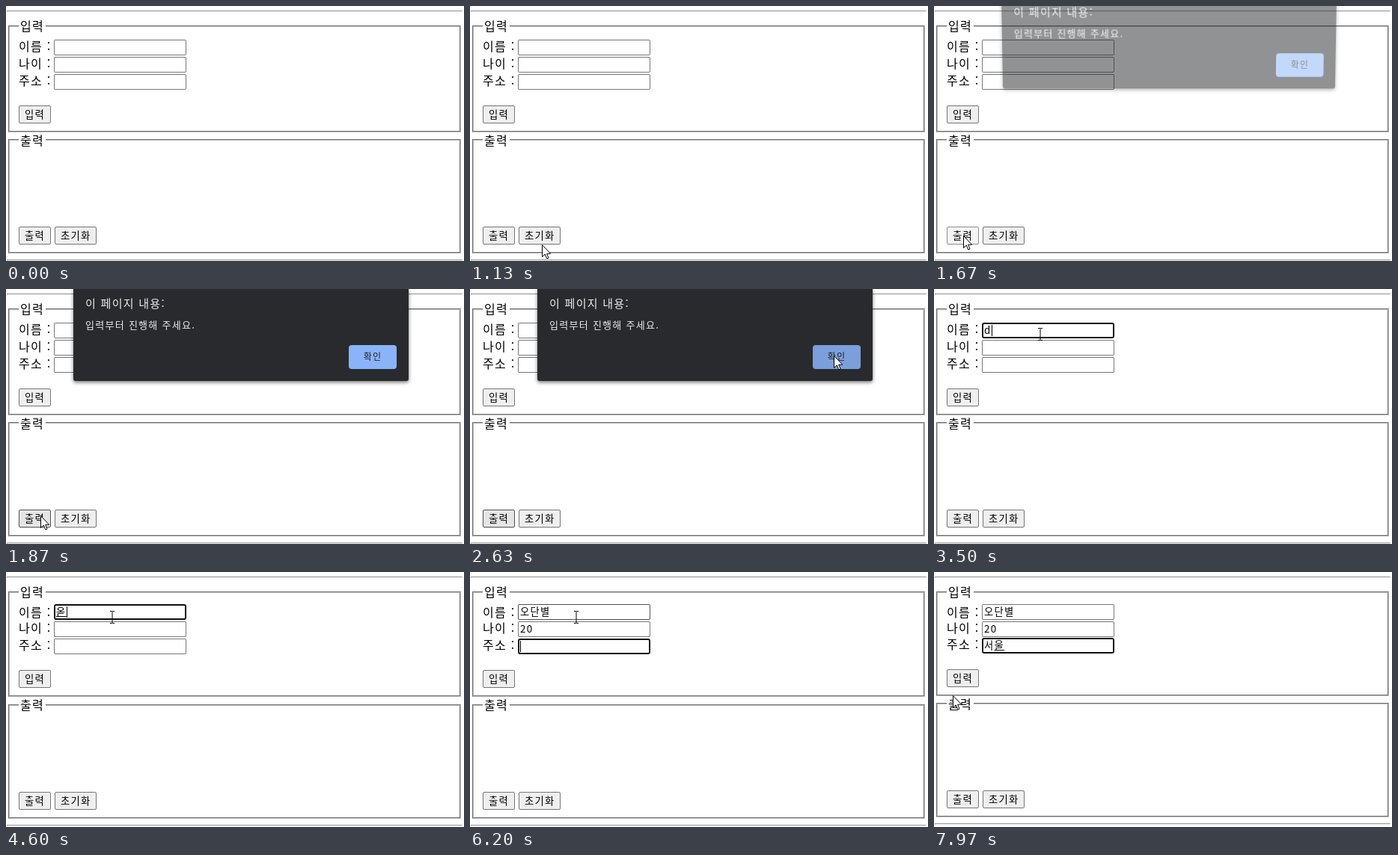
Write an HTML page that moves like this. It is 612 by 341 pixels and loops after 8000 ms.

```html
<!DOCTYPE html>
<html lang="ko">
<head>
<meta charset="utf-8">
<style>
html, body { margin: 0; width: 100%; height: 100%; overflow: hidden; background: #fff; }
body { position: relative; color: #000; font: 16px/20px "Noto Sans CJK KR", "Noto Sans CJK", sans-serif; letter-spacing: .08em; }
body * { position: absolute; box-sizing: border-box; white-space: pre; }
.rule { left: 1px; width: 609px; height: 2px; border: 1px solid; border-color: #9a9a9a #eee #eee #9a9a9a; }
.group { left: 3px; width: 605px; border: 2px groove #c0c0c0; }
.legend { left: 17px; padding: 0 2px; background: #fff; }
.label { left: 17px; }
.field { left: 64px; width: 177px; height: 21px; padding-left: 3px; background: #fff; border-radius: 2px; font-size: 13.33px; line-height: 20px; box-shadow: inset 0 0 0 1px #767676; }
.field.hover { box-shadow: inset 0 0 0 1px #4f4f4f; }
.field.focus { border-radius: 3px; box-shadow: inset 0 0 0 2px #101010; }
.field * { position: static; }
.field i { display: inline-block; width: 1px; height: 15px; margin: 0 -1px 0 0; background: #000; vertical-align: -3px; }
.button { height: 24px; border: 1px solid #767676; border-radius: 2px; background: #efefef; font-size: 13.33px; line-height: 21px; padding-left: 7px; }
.button.hover { background: #e5e5e5; border-color: #4f4f4f; }
.button.active { background: #f5f5f5; border-color: #8d8d8d; }
#popup { left: 64px; top: 67px; width: 190px; height: 125px; background: #292a2d; box-shadow: 0 0 2px #0008; }
#dialog { left: 90px; top: 0; width: 448px; height: 123px; background: #292a2d; color: #e8eaed; border-radius: 0 0 3px 3px; box-shadow: 0 2px 5px #0008; transform-origin: 50% 0; }
#ok { left: 368px; top: 75px; width: 64px; height: 32px; border-radius: 4px; color: #202124; font-size: 12px; line-height: 30px; text-align: center; }
svg { left: 0; top: 0; width: 20px; height: 24px; overflow: visible; }
</style>
</head>
<body>
<script>
const add = (cls, left, top, text = '', width, parent = document.body) => {
  const el = document.createElement('div');
  el.className = cls;
  el.textContent = text;
  if (left !== null) el.style.left = left + 'px';
  if (width) el.style.width = width + 'px';
  el.style.top = top + 'px';
  parent.append(el);
  return el;
};

// Page: each part lists its top for the three layout heights
const parts = [];
const place = (tops, ...args) => {
  const el = add(args[0], args[1] ?? null, tops[0], args[2], args[3]);
  parts.push([el, tops]);
  return el;
};
const early = y => [y, y - 2, y - 3];
const late = y => [y, y - 1, y - 3];

add('rule', null, 6);
const upper = add('group', null, 26);
const lower = place(late(178), 'group');
place(late(339), 'rule');
add('legend', null, 16, '입력');
place(early(169), 'legend', null, '출력');
add('label', null, 43, '이름 :');
place([66, 64, 64], 'label', null, '나이 :');
place(early(89), 'label', null, '주소 :');
const fieldTops = [[45, 43, 43], [68, 66, 66], early(91)];
const fields = fieldTops.map(tops => {
  const el = place(tops, 'field');
  el.innerHTML = '<span></span><u></u><i></i>';
  return el;
});
const enter = place(early(133), 'button', 17, '입력', 43);
const print = place(late(295), 'button', 17, '출력', 43);
place(late(295), 'button', 65, '초기화', 56);

const popup = add('', null, 0);
popup.id = 'popup';
popup.style.top = '';
const dialog = add('', null, 0);
dialog.id = 'dialog';
add('', 16, 9, '이 페이지 내용:', 0, dialog).style.fontSize = '15px';
add('', 16, 38, '입력부터 진행해 주세요.', 0, dialog).style.fontSize = '13px';
const ok = add('', null, 75, '확인', 0, dialog);
ok.id = 'ok';

document.body.insertAdjacentHTML('beforeend', `<svg id="pointer">
  <path id="arrow" d="M.5.5v16l3.7-3.6 2.6 6 2.3-1-2.5-5.7h5.1z" fill="#fff" stroke="#000"/>
  <path id="beam" d="M-3-7.5h2.5l.5.5.5-.5h2.5M0-7v15M-3 8.5h2.5l.5-.5.5.5h2.5" fill="none" stroke="#000"/>
</svg>`);
const pointer = document.getElementById('pointer');
const arrow = document.getElementById('arrow');
const beam = document.getElementById('beam');

// Time, x, y
const route = [
  [270, 498, 165], [300, 353, 90], [330, 365, 62], [600, 365, 62],
  [1050, 110, 322], [1330, 39, 307], [1830, 39, 307], [2370, 486, 89],
  [2660, 486, 89], [2800, 226, 159], [3200, 142, 60], [7730, 142, 60], [7970, 25, 165]
];
const nameSteps = 'ㅇ 오 옫 오다 오단 오단ㅂ 오단벼 오단별'.split(' ');
const citySteps = 'ㅅ 서 성 서우 서울'.split(' ');

const clamp = v => Math.max(0, Math.min(1, v));
const ramp = (t, start, length) => clamp((t - start) / length);
const within = (v, a, b) => v >= a && v < b;

function pointerAt(t) {
  const i = route.findIndex(key => key[0] > t);
  if (i < 0) return route.at(-1).slice(1);
  const [t0, x0, y0] = route[Math.max(0, i - 1)], [t1, x1, y1] = route[i];
  const u = ramp(t, t0, t1 - t0 || 1), e = u * u * (3 - 2 * u);
  return [Math.round(x0 + (x1 - x0) * e), Math.round(y0 + (y1 - y0) * e)];
}

const typed = (steps, t, start, gap) =>
  t < start ? '' : steps[Math.min(steps.length - 1, Math.floor((t - start) / gap))];

function setField(i, text, composing, focus, caret, hover) {
  const [plain, mark, bar] = fields[i].children;
  const cut = composing ? text.length - 1 : text.length;
  plain.textContent = text.slice(0, Math.max(0, cut));
  mark.textContent = text.slice(Math.max(0, cut));
  bar.style.visibility = focus && caret ? '' : 'hidden';
  fields[i].className = 'field' + (focus ? ' focus' : hover ? ' hover' : '');
}

function draw(t) {
  const layout = t < 4430 ? 0 : t < 6700 ? 1 : 2;
  for (const [el, tops] of parts) el.style.top = tops[layout] + 'px';
  upper.style.height = early(169)[layout] - 26 + 'px';
  lower.style.height = late(331)[layout] - late(178)[layout] + 'px';

  const [x, y] = pointerAt(t);
  const blocked = within(t, 1610, 2720);
  const over = !blocked && t >= 270 && within(x, 64, 241)
    ? fieldTops.findIndex(tops => within(y, tops[layout], tops[layout] + 21)) : -1;
  pointer.style.display = t < 270 ? 'none' : '';
  pointer.style.transform = `translate(${x}px,${y}px)`;
  arrow.style.display = over < 0 ? '' : 'none';
  beam.style.display = over < 0 ? 'none' : '';

  const name = t < 4430 ? (within(t, 3500, 4270) ? 'd' : '') : typed(nameSteps, t, 4430, 85);
  setField(0, name, within(t, 4430, 5170), within(t, 3230, 5170), !within(t, 4030, 4270), over === 0);
  setField(1, t < 5700 ? '' : t < 5870 ? '2' : '20', false, within(t, 5170, 6200), true, over === 1);
  setField(2, typed(citySteps, t, 6700, 100), t >= 6700, t >= 6200, t < 7200, over === 2);
  popup.style.display = within(t, 3300, 3500) ? '' : 'none';

  const onButton = top => within(x, 17, 60) && within(y, top, top + 24);
  print.className = 'button' + (within(t, 1570, 1800) ? ' active'
    : within(t, 1800, 2720) || (t > 600 && t < 1570 && onButton(295)) ? ' hover' : '');
  enter.className = 'button' + (t > 7730 && onButton(130) ? ' hover' : '');

  const shown = t < 2700 ? 1 - (1 - ramp(t, 1610, 200)) ** 2 : 1 - ramp(t, 2710, 170);
  const away = 1 - shown;
  dialog.style.display = shown > 0 ? '' : 'none';
  dialog.style.opacity = shown;
  dialog.style.transform = away
    ? `translateY(${-23 * away}px) perspective(1000px) rotateX(${-9 * away}deg)` : 'none';
  const press = ramp(t, 2340, 160);
  ok.style.background = `rgb(${138 - 15 * press},${180 - 21 * press},${248 - 29 * press})`;
}

function tick() {
  draw(performance.now() % 8000);
  requestAnimationFrame(tick);
}
tick();
</script>
</body>
</html>
```
